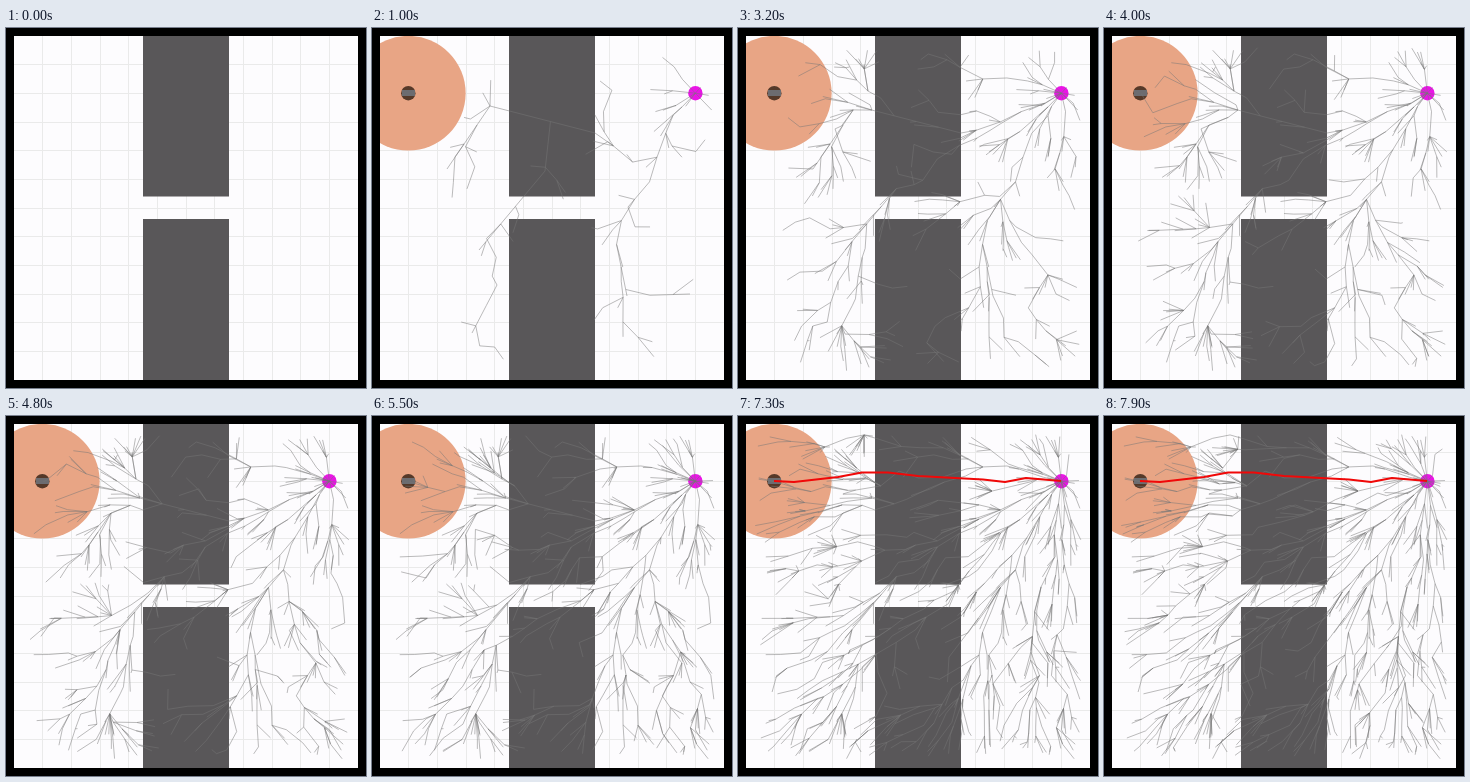
Recreate the animation shown at these times as an HTML page with a canvas. Size 360x360 px, loop 8 s.

```html
<!DOCTYPE html>
<html lang="en">
<head>
<meta charset="utf-8">
<title>Growing search tree</title>
<style>
html, body { margin: 0; width: 100%; height: 100%; overflow: hidden; background: #000; }
canvas { display: block; }
</style>
</head>
<body>
<canvas id="stage" width="360" height="360"></canvas>
<script>
const ctx = document.getElementById('stage').getContext('2d');
const LOOP = 8000, TICK = 100, TREE_START = 200, ROUTE_START = 6900;
const PER_TICK = 13, STEP = 15, LONG_STEP = 23, REACH = 26;
const CELL = 344 / 12;
const START = { x: 323.4, y: 65.2 }, GOAL = { x: 36.3, y: 65.2 };

// Far points that the main branches head for, in order of growth.
const branchTips = [
  [303, 78], [223, 105], [300, 118], [256, 179], [118, 78], [173, 143],
  [107, 222], [75, 141], [255, 268], [125, 257], [318, 266], [100, 305], [240, 62]
].map(([x, y]) => ({ x, y }));

const route = [
  [36, 65], [56, 66], [100, 61], [124, 56.5], [150, 56.5],
  [180, 60], [245, 63.5], [267, 66], [288, 62], [323, 65]
];

let seed = 41;
function random() {
  seed = (seed * 1664525 + 1013904223) >>> 0;
  return seed / 4294967296;
}

const distance = (a, b) => Math.hypot(a.x - b.x, a.y - b.y);
const cost = n => n.parent ? distance(n, n.parent) + cost(n.parent) : 0;
const nearest = (nodes, p) => nodes.reduce((a, b) => distance(b, p) < distance(a, p) ? b : a);
const inBlock = p => p.x > 137 && p.x < 223 && (p.y < 168 || p.y > 191);

// The sampled area widens to the left as the tree grows.
function sample(count) {
  const left = Math.max(17, 70 - count * 0.1);
  let p;
  do {
    p = { x: left + random() * (343 - left), y: 18 + random() * 325 };
  } while (inBlock(p) && random() < 0.35);
  return p;
}

function steer(from, to, step) {
  const k = Math.min(1, step / (distance(from, to) || 1));
  return { x: from.x + (to.x - from.x) * k, y: from.y + (to.y - from.y) * k };
}

// Link a node to its cheapest neighbour, then shorten the others through it.
function connect(nodes, node) {
  const near = nodes.filter(n => distance(n, node) < REACH).map(n => ({ n, c: cost(n) }));
  node.parent = nearest(nodes, node);
  let best = cost(node);
  for (const { n, c } of near) {
    const through = c + distance(n, node);
    if (through < best) {
      best = through;
      node.parent = n;
    }
  }
  for (const { n, c } of near) {
    if (best + distance(n, node) < c - 0.01) n.parent = node;
  }
  nodes.push(node);
}

function grow(nodes, tips) {
  const guided = tips.length > 0 && random() < 0.6;
  const target = guided ? tips[0] : sample(nodes.length);
  const node = steer(nearest(nodes, target), target, guided ? LONG_STEP : STEP);
  if (guided && distance(node, target) < 1) tips.shift();
  connect(nodes, node);
}

function traceTree(nodes) {
  const path = new Path2D();
  for (const n of nodes) {
    if (!n.parent) continue;
    path.moveTo(n.parent.x, n.parent.y);
    path.lineTo(n.x, n.y);
  }
  return path;
}

// One outline of the whole tree for every tick.
function buildTrees() {
  const nodes = [{ ...START }], tips = [...branchTips], trees = [];
  for (let time = TREE_START; time < LOOP; time += TICK) {
    for (let k = 0; k < PER_TICK; k++) grow(nodes, tips);
    trees.push(traceTree(nodes));
  }
  return trees;
}

const trees = buildTrees();

function rect(color, x, y, w, h) {
  ctx.fillStyle = color;
  ctx.fillRect(x, y, w, h);
}

function disc(color, { x, y }, r) {
  ctx.fillStyle = color;
  ctx.beginPath();
  ctx.arc(x, y, r, 0, 2 * Math.PI);
  ctx.fill();
}

function drawMap() {
  rect('#000', 0, 0, 360, 360);
  rect('#fdfcfe', 8, 8, 344, 344);
  for (let i = 1; i < 12; i++) {
    const at = Math.floor(8 + i * CELL);
    rect('#eaeaea', at, 8, 1, 344);
    rect('#eaeaea', 8, at, 344, 1);
  }
  rect('#595759', 137, 8, 86, 160.5);
  rect('#595759', 137, 191, 86, 161);
}

function drawGoal() {
  ctx.save();
  ctx.beginPath();
  ctx.rect(8, 8, 344, 344);
  ctx.clip();
  disc('#e8a585', GOAL, 2 * CELL);
  ctx.restore();
  disc('#553929', GOAL, 7.2);
  rect('#6c6c70', 30, 62, 13, 6);
}

function strokeWith(color, width, path) {
  ctx.strokeStyle = color;
  ctx.lineWidth = width;
  ctx.lineJoin = 'round';
  ctx.stroke(path);
}

const routePath = new Path2D();
route.forEach(([x, y]) => routePath.lineTo(x, y));

function draw(time) {
  const t = time % LOOP;
  drawMap();
  if (t >= TREE_START) {
    drawGoal();
    disc('#ea14e6', START, 7.2);
    strokeWith('#777', 0.5, trees[Math.floor((t - TREE_START) / TICK)]);
  }
  if (t >= ROUTE_START) strokeWith('#f00808', 2.2, routePath);
}

const began = performance.now();
function frame() {
  draw(performance.now() - began);
  requestAnimationFrame(frame);
}
frame();
</script>
</body>
</html>
```
